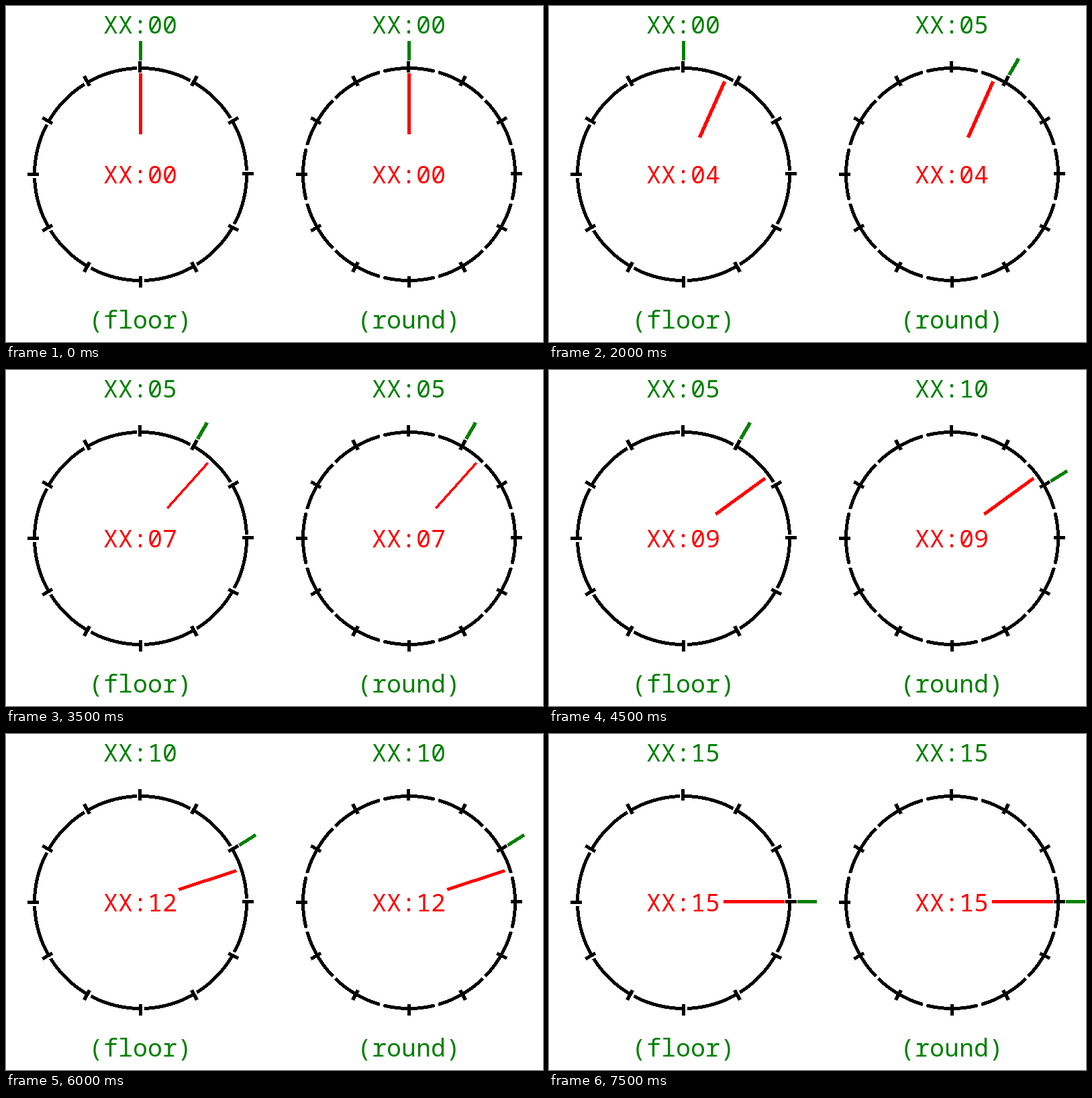
An HTML page with a canvas for the animation above (8 s loop, 800x500 px).

```html
<!DOCTYPE html>
<html lang="en">
<head>
<meta charset="utf-8">
<title>Rounding to five minutes</title>
<style>
  html, body { margin: 0; width: 800px; height: 500px; overflow: hidden; background: #fff; }
  canvas { display: block; }
</style>
</head>
<body>
<canvas id="stage" width="800" height="500"></canvas>
<script>
const ctx = document.getElementById('stage').getContext('2d');
const LOOP = 8000, STEP = 500, CY = 250;
const GREEN = '#008000', RED = '#ff0000', BLACK = '#000000';

const dials = [
  { cx: 200, label: '(floor)', shift: 0, snap: Math.floor },
  { cx: 600, label: '(round)', shift: 14, snap: Math.round }
];

// Hard-edged fill of a convex polygon, border pixels included.
function fillPoly(g, pts) {
  const ys = pts.map(p => p[1]);
  for (let y = Math.min(...ys); y <= Math.max(...ys); y++) {
    const xs = [];
    pts.forEach(([ax, ay], i) => {
      const [bx, by] = pts[(i + 1) % pts.length];
      if (y < Math.min(ay, by) || y > Math.max(ay, by)) return;
      if (ay === by) xs.push(ax, bx);
      else xs.push(ax + (bx - ax) * (y - ay) / (by - ay));
    });
    const left = Math.round(Math.min(...xs));
    g.fillRect(left, y, Math.round(Math.max(...xs)) - left + 1, 1);
  }
}

// Five pixel wide spoke at a minute mark, snapped to whole pixels.
function spoke(g, cx, minute, from, to, color) {
  const a = minute * Math.PI / 30, s = Math.sin(a), c = Math.cos(a);
  const at = r => [Math.trunc(cx + r * s), Math.trunc(CY - r * c)];
  const [x0, y0] = at(from), [x1, y1] = at(to);
  const len = Math.hypot(x1 - x0, y1 - y0);
  const ox = Math.round(2 * (y1 - y0) / len);
  const oy = Math.round(2 * (x1 - x0) / len);
  g.fillStyle = color;
  fillPoly(g, [
    [x0 - ox, y0 + oy], [x1 - ox, y1 + oy],
    [x1 + ox, y1 - oy], [x0 + ox, y0 - oy]
  ]);
}

// Ring cut into twelve 28 degree arcs.
function ring(g, cx, shift) {
  g.fillStyle = BLACK;
  for (let y = -160; y <= 160; y++) {
    for (let x = -160; x <= 160; x++) {
      const r = Math.hypot(x, y);
      if (r < 155.5 || r > 160.5) continue;
      const deg = Math.atan2(x, -y) * 180 / Math.PI + 360 + shift;
      if (deg % 30 <= 28) g.fillRect(cx + x, CY + y, 1, 1);
    }
  }
}

function write(g, text, x, y, color) {
  g.font = '36.67px "Noto Sans Mono", "DejaVu Sans Mono", monospace';
  g.textAlign = 'center';
  g.textBaseline = 'alphabetic';
  g.fillStyle = color;
  g.fillText(text, x, y);
}

const face = document.createElement('canvas');
face.width = 800;
face.height = 500;
const fg = face.getContext('2d');
for (const d of dials) {
  ring(fg, d.cx, d.shift);
  for (let i = 1; i <= 12; i++) spoke(fg, d.cx, i * 5, 152, 168, BLACK);
}

const clock = m => 'XX:' + String(m).padStart(2, '0');

function draw(now) {
  const minute = Math.floor((now % LOOP) / STEP);
  ctx.fillStyle = '#fff';
  ctx.fillRect(0, 0, 800, 500);
  ctx.drawImage(face, 0, 0);
  for (const { cx, label, snap } of dials) {
    const mark = snap(minute / 5) * 5;
    spoke(ctx, cx, minute, 60, 150, RED);
    spoke(ctx, cx, mark, 170, 198, GREEN);
    write(ctx, clock(mark), cx, 41, GREEN);
    write(ctx, clock(minute), cx, 264, RED);
    write(ctx, label, cx, 480, GREEN);
  }
}

const start = performance.now();
function tick() {
  draw(performance.now() - start);
  requestAnimationFrame(tick);
}
tick();
</script>
</body>
</html>
```
